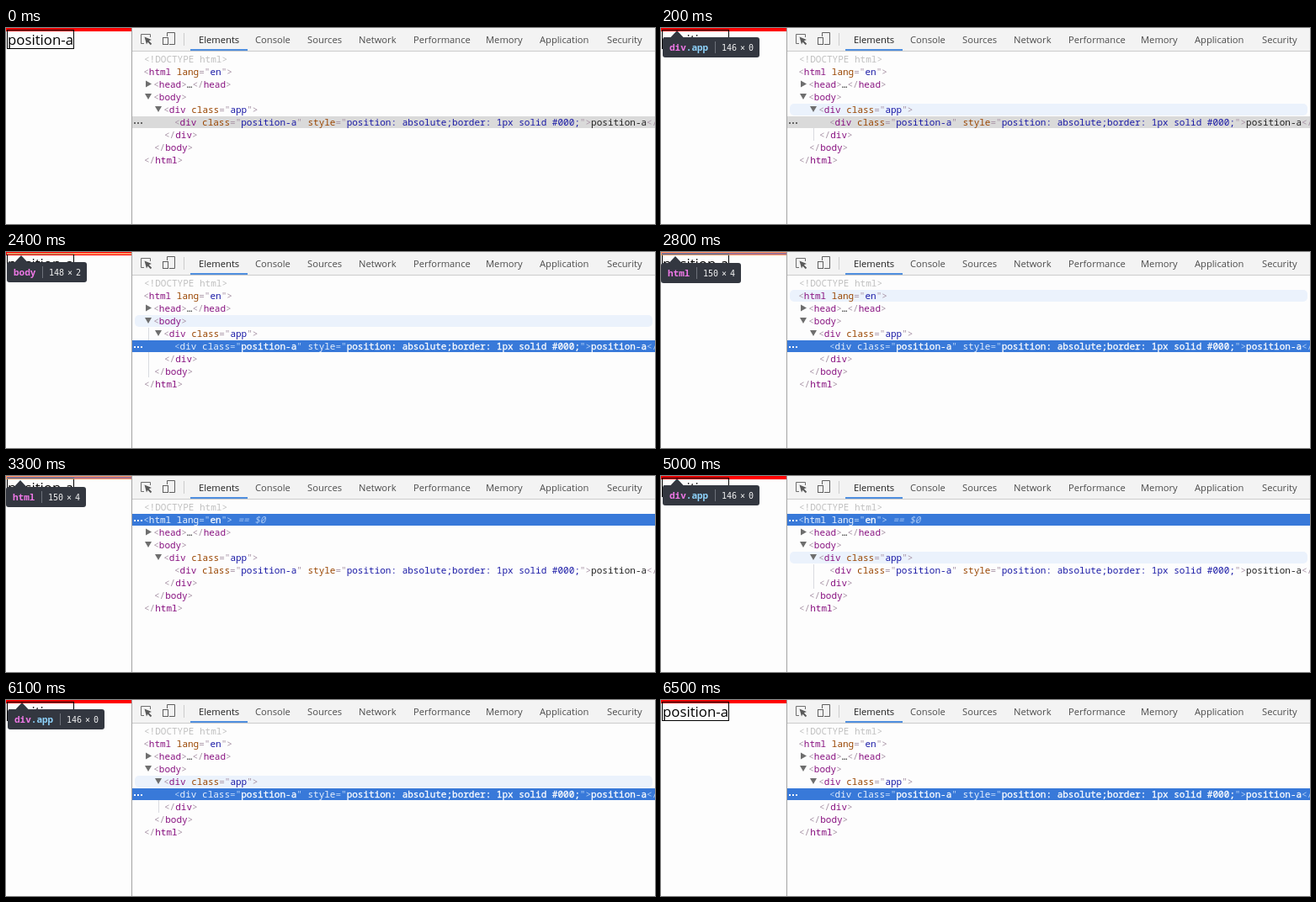
An HTML page for the animation above (6.8 s loop, 771 px wide and 233 px high).

```html
<!DOCTYPE html>
<html lang="en">
<head>
<meta charset="utf-8">
<title>Inspecting an absolutely positioned element</title>
<style>
  html, body { margin: 0; width: 100%; height: 100%; overflow: hidden; background: #fdfdfd; }
  svg { display: block; }
  text { white-space: pre; }
  .tab { font: 11.2px "Open Sans", "Noto Sans", sans-serif; fill: #4c4c4c; }
  .tab.current { fill: #222; }
  .page { font: 16.8px "Open Sans", "Noto Sans", sans-serif; }
  .row text { font: 11px "Noto Sans Mono", "DejaVu Sans Mono", monospace; fill: #222; }
  .row .p { fill: #a894a6; }
  .row .t { fill: #881280; }
  .row .a { fill: #994500; }
  .row .v { fill: #1a1aa6; }
  .row .d { fill: #c0c0c0; }
  .row .ref { fill: none; font-style: italic; }
  .row .bar, .row .dots { display: none; }
  .row.idle .bar, .row.lit .bar, .row.idle .dots, .row.lit .dots { display: inline; }
  .row .bar { fill: #dadada; }
  .row .dots { fill: #666; }
  .row.lit .bar { fill: #3879d9; }
  .row.lit .dots { fill: #fff; }
  .row.lit text, .row.lit .v { fill: #fff; stroke: #fff; stroke-width: .3px; }
  .row.lit .t, .row.lit .a { fill: #eaf2fd; stroke: none; }
  .row.lit .p { fill: #b4d1f6; stroke: none; }
  .row.lit .ref { fill: #a9c8f3; stroke: none; }
  .hover { fill: #ebf2fc; }
  .guide { fill: #d9dbe0; }
  .arrow { fill: #6e6e6e; }
  .tip { fill: #333740; }
  .name { font: bold 11px "Noto Sans Mono", "DejaVu Sans Mono", monospace; fill: #ee78e6; }
  .name .cls { fill: #8ed3fb; }
  .size { font: 10px "DejaVu Sans Mono", "Noto Sans Mono", monospace; fill: #f0f0f0; }
  .edge { fill: none; stroke: #ffe599; stroke-opacity: .66; }
  .content { fill: #6fa8dc; fill-opacity: .66; }
</style>
</head>
<body>
<svg width="771" height="233" viewBox="0 0 771 233">
  <rect width="771" height="233" fill="#fdfdfd"/>
  <g id="page">
    <rect width="149" height="4" fill="#f00"/>
    <rect x="1.5" y="2.5" width="79" height="22" fill="none" stroke="#000"/>
    <text class="page" x="2" y="20">position-a</text>
  </g>
  <g id="overlays"></g>
  <rect x="150" width="621" height="233" fill="#fdfdfd"/>
  <rect x="149" width="1" height="233" fill="#a3a3a3"/>
  <g id="toolbar">
    <rect x="150" width="621" height="27" fill="#f3f3f3"/>
    <rect x="150" y="27" width="621" height="1" fill="#ccc"/>
    <path d="M164 18.5H160.5V7.5H171.5V11" fill="none" stroke="#6e6e6e"/>
    <path d="M164.5 10.5L173 14L169.8 15.3L173.2 18.8L171.8 20.2L168.4 16.7L167 19.5Z" fill="#5a5a5a"/>
    <path d="M191.5 10V5.5H200.5V19.5H194" fill="none" stroke="#5f5f5f"/>
    <rect x="186.5" y="11.5" width="6" height="8" fill="none" stroke="#5f5f5f"/>
    <rect x="211" y="6" width="1" height="15" fill="#ccc"/>
    <rect x="219" y="25" width="68" height="2" fill="#4f8fdf"/>
  </g>
  <g id="hovers"></g>
  <g id="tree"></g>
</svg>
<script>
  const LOOP = 6800;
  const CHAR = 6.6;
  const byId = id => document.getElementById(id);
  const span = (cls, s) => `<tspan class="${cls}">${s}</tspan>`;
  const box = (x, y, w, h, cls, more = '') =>
    `<rect x="${x}" y="${y}" width="${w}" height="${h}" class="${cls}" ${more}/>`;

  // Toolbar tabs
  const tabs = { Elements: 229, Console: 296, Sources: 358, Network: 419,
    Performance: 484, Memory: 570, Application: 634, Security: 714 };
  byId('toolbar').innerHTML += Object.entries(tabs).map(([label, x], i) =>
    `<text class="tab ${i ? '' : 'current'}" x="${x}" y="18">${label}</text>`).join('');

  // Element tree
  const attr = (name, value) =>
    ' ' + span('a', name) + span('p', '="') + span('v', value) + span('p', '"');
  const open = (name, attrs = '') =>
    span('p', '&lt;') + span('t', name) + attrs + span('p', '&gt;');
  const close = name => span('p', '&lt;/') + span('t', name) + span('p', '&gt;');

  const rowTop = i => 30 + 15 * i;
  const indent = depth => 164 + 12 * depth;
  const arrows = { shut: 'm1 2.5l7 4l-7 4z', open: 'm0 3h8l-4 7z', root: '' };
  const style = 'position: absolute;border: 1px solid #000;';
  const rows = [
    { depth: 0, html: span('d', '&lt;!DOCTYPE html&gt;') },
    { depth: 0, html: open('html', attr('lang', 'en')) + span('ref', ' == $0'),
      id: 'html', fold: 'root' },
    { depth: 1, html: open('head') + '…' + close('head'), fold: 'shut' },
    { depth: 1, html: open('body'), fold: 'open' },
    { depth: 2, html: open('div', attr('class', 'app')), fold: 'open' },
    { depth: 3, html: open('div', attr('class', 'position-a') + attr('style', style)) +
      'position-a' + close('div'), id: 'box' },
    { depth: 2, html: close('div') },
    { depth: 1, html: close('body') },
    { depth: 0, html: close('html') }
  ];
  byId('tree').innerHTML = rows.map(({ depth, html, id, fold }, i) => {
    const x = indent(depth), y = rowTop(i);
    const dots = [152, 156, 160].map(dx => box(dx, y + 7, 2, 2, 'dots')).join('');
    const arrow = fold ? `<path class="arrow" d="M${x - 11} ${y}${arrows[fold]}"/>` : '';
    return `<g class="row" ${id ? `id="row-${id}"` : ''}>` +
      box(150, y, 621, 14, 'bar') + dots + arrow +
      `<text x="${fold ? x - .8 : x}" y="${y + 11}">${html}</text></g>`;
  }).join('');

  // Row highlight and the guide line beside its children
  const hoverRow = (key, i, guide = '') =>
    `<g id="hover-${key}">${box(153, rowTop(i), 615, 14, 'hover', 'rx="5"')}${guide}</g>`;
  byId('hovers').innerHTML =
    hoverRow('html', 1) +
    hoverRow('head', 2) +
    hoverRow('body', 3, box(169, 90, 1, 59, 'guide')) +
    hoverRow('app', 4, box(181, 105, 1, 29, 'guide')) +
    hoverRow('box', 5);

  // Page highlight with its size label
  function tip(x, bottom, lines, width, height) {
    const y = bottom + 9;
    const chars = Math.max(...lines.map(line => line.join('').length));
    const slack = lines.length > 1 ? 3 : 0; // a wrapped name fills its column
    const split = Math.round(x + 15.3 + chars * CHAR + slack);
    const end = split + 22 + 6 * (width + height).length;
    const h = 10 + 14 * lines.length;
    const names = lines.map(([tag, cls], i) =>
      `<text class="name" x="${x + 8}" y="${y + 16 + 14 * i}">${tag}${span('cls', cls)}</text>`);
    return `<path class="tip" d="M${x + 9} ${y + .5}L${x + 17} ${bottom + 1}L${x + 25} ${y + .5}Z"/>` +
      box(x, y, end - x + 7, h, 'tip', 'rx="3"') + names.join('') +
      box(split, y + 5, 1, h - 10, '', 'fill="#6d717a"') +
      `<text class="size" x="${split + 8}" y="${y + h / 2 + 4}">${width}` +
      `<tspan dx="4">×</tspan><tspan dx="4">${height}</tspan></text>`;
  }
  const overlay = (key, ...parts) => `<g id="overlay-${key}">${parts.join('')}</g>`;
  byId('overlays').innerHTML =
    overlay('html', box(.5, .5, 149, 3, 'edge'), box(1, 1, 148, 2, 'content'),
      tip(0, 4, [['html', '']], '150', '4')) +
    overlay('body', box(1.5, 1.5, 147, 1, 'edge'),
      tip(1, 3, [['body', '']], '148', '2')) +
    overlay('app', tip(2, 2, [['div', '.app']], '146', '0')) +
    overlay('box', box(1.5, 2.5, 79, 22, 'edge'), box(2, 3, 78, 21, 'content'),
      tip(2, 25, [['div', '.posi'], ['', 'tion-a']], '80.08', '23'));

  // Start time and value of each step
  const hoverSteps = [[0, ''], [100, 'html'], [200, 'app'], [600, 'box'], [2400, 'body'],
    [2500, 'head'], [2800, 'html'], [5000, 'app'], [5100, 'box'], [6100, 'app'],
    [6300, 'body'], [6500, '']];
  const selectSteps = [[0, 'idle'], [1000, 'box'], [3300, 'html'], [5500, 'box']];
  const at = (steps, t) => steps.filter(([start]) => start <= t).pop()[1];
  const show = (el, on) => { if (el) el.style.display = on ? 'inline' : 'none'; };

  function draw() {
    const t = performance.now() % LOOP;
    const hovered = at(hoverSteps, t);
    const selected = at(selectSteps, t);
    for (const key of ['html', 'head', 'body', 'app', 'box']) {
      show(byId('hover-' + key), key === hovered);
      show(byId('overlay-' + key), key === hovered);
    }
    byId('row-box').classList.toggle('idle', selected === 'idle');
    for (const key of ['html', 'box']) {
      byId('row-' + key).classList.toggle('lit', key === selected);
    }
    requestAnimationFrame(draw);
  }
  draw();
</script>
</body>
</html>
```
